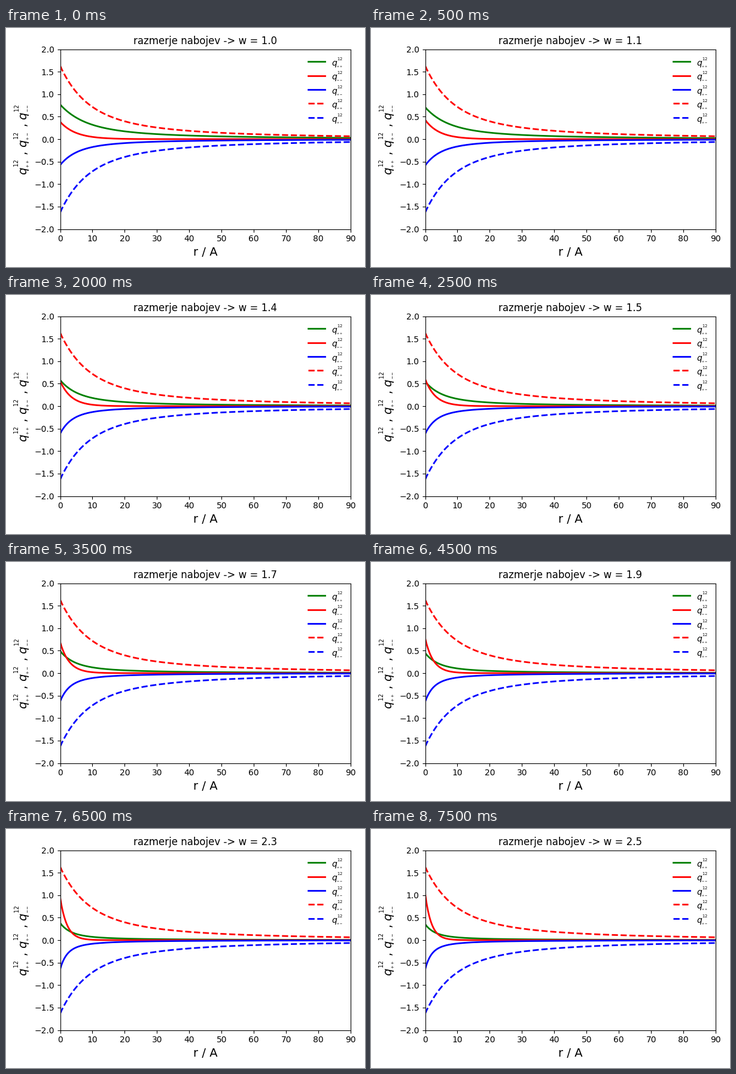
A matplotlib script for the animation above (8 s loop, 600 by 400 pixels).

```python
import numpy as np
import matplotlib.pyplot as plt
from matplotlib.animation import FuncAnimation
from matplotlib.lines import Line2D

W, H, DPI = 600, 400, 100
FRAMES, INTERVAL = 16, 500
SCREENING = 0.005

plt.rcParams["font.family"] = "DejaVu Sans"
r = np.linspace(1e-6, 90, 900)


def yukawa(start, reach):
    """Difference of two screened potentials: `start` at r = 0, tail ~ reach / r."""
    return reach / r * np.exp(-SCREENING * r) * -np.expm1(-start / reach * r)


def plus_plus(w):
    return yukawa(0.77 * w ** -0.845, 3.9 * w ** -1.95)


def minus_minus(w):
    return (0.385 + 0.432 * (w - 1)) * np.exp(-(0.205 + 0.21 * (w - 1)) * r)


def plus_minus(w):
    return -yukawa(0.70 - 0.125 / w, 1.95 / w)


def symbol(signs):
    return rf"$q_{{_{{^{{{signs}}}}}}}^{{^{{12}}}}$"


def title(w):
    return f"razmerje nabojev -> w = {w:.1f}"


fig = plt.figure(figsize=(W / DPI, H / DPI), dpi=DPI, facecolor="white")
ax = fig.add_axes([90.5 / W, 63.5 / H, 485.7 / W, 301 / H])
ax.set_xlim(0, 90)
ax.set_ylim(-2, 2)
ax.set_xticks(range(0, 91, 10))
ax.set_yticks(np.arange(-2, 2.1, 0.5))
ax.set_xlabel("r / A", fontsize=14)
heading = ax.set_title(title(1), fontsize=12)
fig.text(32 / W, 1 - 186.5 / H, " , ".join(map(symbol, ("++", "+-", "--"))),
         fontsize=14, rotation=90, rotation_mode="anchor",
         ha="center", va="baseline")

moving = [
    (ax.plot(r, curve(1), color=color, lw=2)[0], curve)
    for curve, color in ((plus_plus, "green"), (minus_minus, "red"),
                         (plus_minus, "blue"))
]
fixed = yukawa(1.63, 9.0)
ax.plot(r, fixed, "--", color="red", lw=2)
ax.plot(r, -fixed, "--", color="blue", lw=2)

legend = (("green", "-", "++"), ("red", "-", "--"), ("blue", "-", "+-"),
          ("red", "--", "++"), ("blue", "--", "+-"))
for row, (color, style, signs) in enumerate(legend):
    y = 56 + 23.5 * row
    fig.add_artist(Line2D([505 / W, 532.6 / W], [1 - y / H] * 2,
                          color=color, ls=style, lw=2))
    fig.text(543.7 / W, 1 - (y + 4.5) / H, symbol(signs),
             fontsize=10, va="baseline")


def update(i):
    w = 1 + i / 10
    heading.set_text(title(w))
    for line, curve in moving:
        line.set_ydata(curve(w))
    return [heading] + [line for line, _ in moving]


anim = FuncAnimation(fig, update, frames=FRAMES, interval=INTERVAL,
                     repeat=True, repeat_delay=0, blit=False)
plt.show()
```
